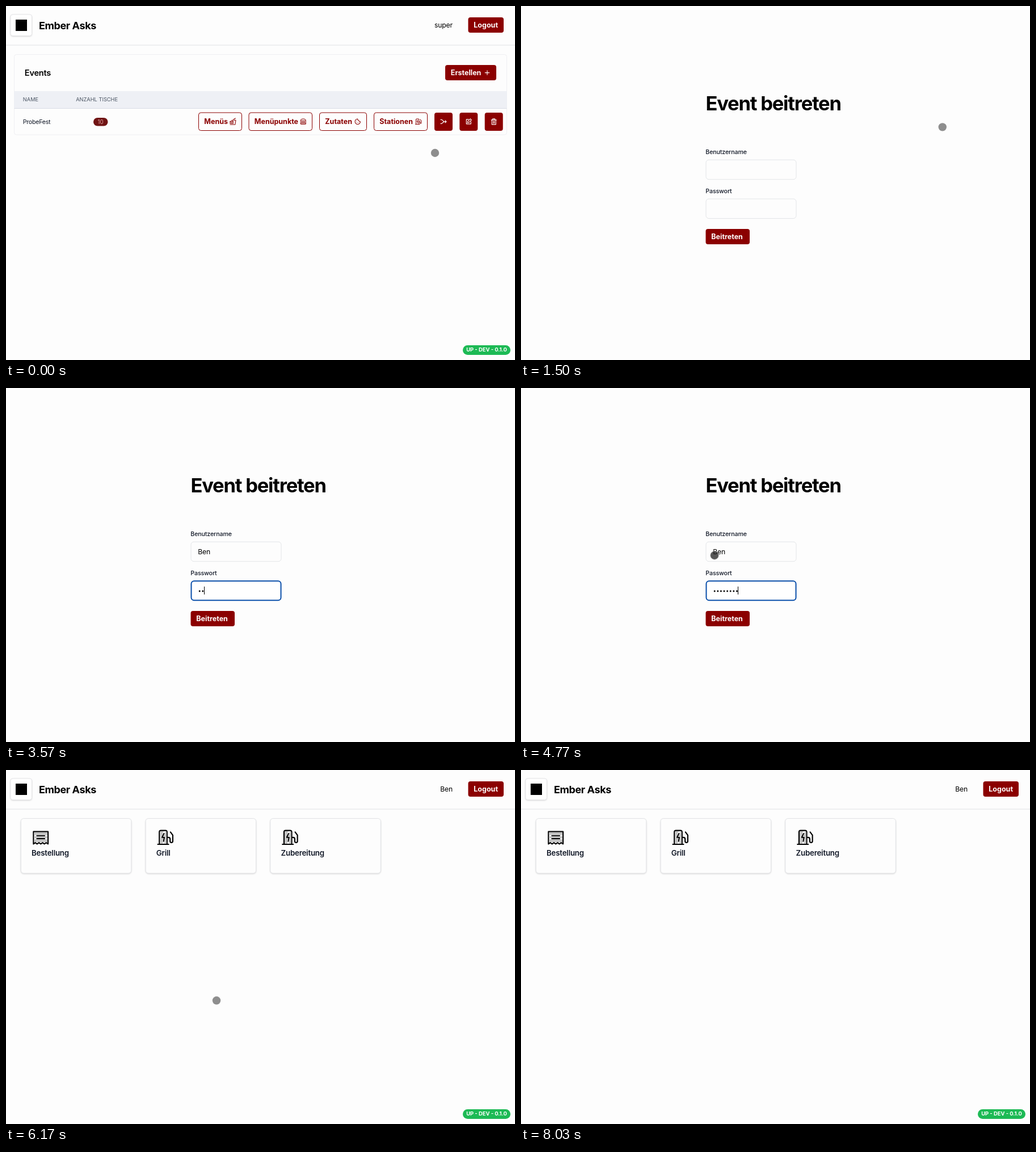
Recreate the animation shown at these times as an HTML page. Size 897x624 px, loop 8.11 s.

```html
<!DOCTYPE html>
<html lang="de">
<head>
<meta charset="utf-8">
<title>Event beitreten</title>
<style>
html, body { margin: 0; width: 100%; height: 100%; overflow: hidden; background: #fdfdfd; }
svg { display: block; width: 897px; height: 624px; }
text { font-family: Inter, "Open Sans", sans-serif; font-optical-sizing: none; white-space: pre; }
.shadow { filter: drop-shadow(0 1px 1px rgba(0, 0, 0, .14)); }
</style>
</head>
<body>
<svg id="stage" viewBox="0 0 897 624"></svg>
<script>
const LOOP = 8110, RED = '#8b0000', PAPER = '#fdfdfd';
const $ = id => document.getElementById(id);

const rect = (x, y, w, h, r, fill, more = '') =>
  `<rect x="${x}" y="${y}" width="${w}" height="${h}" rx="${r}" fill="${fill}" ${more}/>`;
const text = (x, y, str, size, weight = 400, fill = '#000', gap = 0, more = '') =>
  `<text x="${x}" y="${y}" font-size="${size}" font-weight="${weight}" fill="${fill}" letter-spacing="${gap}" ${more}>${str}</text>`;
const END = 'text-anchor="end"', MIDDLE = 'text-anchor="middle"';

// Icons live on a 24 unit grid
const shapes = {
  plus: 'M12 3v18M3 12h18',
  merge: 'M2 5h3c4 0 5 7 10 7h7M2 19h3c4 0 5-7 10-7M18 8l4 4-4 4',
  edit: 'M12 4H4v16h16v-8M8 16l1-5 9-9 4 4-9 9z',
  trash: 'M3 6h18M8 6V2h8v4M5 6v16h14V6M10 10v8M14 10v8',
  menu: 'M2 14a6 4 0 0 1 12 0zM2 18h12M3 22h17l2-15H9v3M15 7l1-4 5-2',
  burger: 'M3 9a9 6 0 0 1 18 0zM2 13h20M3 17h18v1a3 3 0 0 1-3 3H6a3 3 0 0 1-3-3z',
  cookie: 'M12 3a9 9 0 1 0 9 9a4 4 0 0 1-5-4a4 4 0 0 1-4-5zM8 10h.1M9 15h.1M14 15h.1',
  pump: 'M4 21V5a2 2 0 0 1 2-2h6a2 2 0 0 1 2 2v16zM2 21h14M14 12h2a2 2 0 0 1 2 2v3a1.7 1.7 0 0 0 3.5 0V9l-3-4M10 7l-2.5 5h3l-1 5',
  receipt: 'M2.5 4.5h19v16l-2.4-1.6-2.4 1.6-2.3-1.6-2.4 1.6-2.4-1.6-2.4 1.6-2.3-1.6-2.4 1.6zM7 9.7h10M7 13.7h10'
};
const icon = (name, x, y, size, color, width = 2, fill = 'none') =>
  `<path d="${shapes[name]}" transform="translate(${x} ${y}) scale(${size / 24})" fill="${fill}" stroke="${color}" stroke-width="${width}" stroke-linecap="round" stroke-linejoin="round"/>`;

const button = (x, y, w, h, label) =>
  rect(x, y, w, h, 4, RED) + text(x + 9.8, y + 18.3, label, 12.5, 700, '#fff');
const outlineButton = (x, w, label, name) =>
  rect(x, 188, w, 31.5, 4, PAPER, `stroke="${RED}"`) + text(x + 9.8, 208.3, label, 12.5, 700, RED) +
  icon(name, x + w - 22, 197.5, 12.5, RED);
const iconButton = (x, name) => rect(x, 188, 32, 32, 4, RED) + icon(name, x + 10, 197.8, 12, '#fff', 2.3);

const frame = user =>
  rect(8, 15, 37.5, 37.5, 4, '#fff', 'stroke="#e4e4e7" class="shadow"') + rect(17, 24, 20, 20, 0, '#000') +
  text(58, 40.5, 'Ember Asks', 18, 700, '#000', -.4) +
  text(787, 38.2, user, 12.2, 400, '#000', -.15, END) +
  button(814.5, 20, 62.5, 27, 'Logout') + rect(0, 68.5, 897, 1, 0, '#dfe1e5') +
  rect(805, 598, 84, 17, 8.5, '#1dba55') + text(847, 609.4, 'UP - DEV - 0.1.0', 9.4, 700, '#fff', 0, MIDDLE);

const eventsPage = frame('super') +
  rect(14.5, 85.5, 868, 141.5, 4, 'none', 'stroke="#efeff2"') +
  text(32.8, 123, 'Events', 14.6, 600, '#000', -.25) +
  button(774, 104, 90, 27, 'Erstellen') + icon('plus', 843, 112.6, 10, '#fff', 2.6) +
  rect(14.5, 150, 868, 30, 0, '#eef0f5') + rect(14.5, 180, 868, 1, 0, '#d9dde5') +
  text(29.8, 167.9, 'NAME', 9.25, 400, '#4b5563') + text(123.2, 167.9, 'ANZAHL TISCHE', 9.25, 400, '#4b5563') +
  text(29.8, 207.6, 'ProbeFest', 10.7, 400, '#111827', -.3) +
  rect(154, 197, 25.5, 14.5, 7.25, '#701414') + text(166.7, 207.7, '10', 9.8, 400, '#e0a3a3', 0, MIDDLE) +
  outlineButton(339.5, 76, 'Menüs', 'menu') + outlineButton(428, 111.5, 'Menüpunkte', 'burger') +
  outlineButton(552.5, 83, 'Zutaten', 'cookie') + outlineButton(648.5, 94, 'Stationen', 'pump') +
  iconButton(755, 'merge') + iconButton(799.3, 'edit') + iconButton(843.7, 'trash');

const field = (y, id) =>
  rect(326, y, 159, 34.5, 5, PAPER, 'stroke="#e3e5e8"') +
  rect(326.5, y + .3, 158, 34, 5, '#fff', `stroke="#0b50ab" stroke-width="2" id="${id}"`);
const dots = Array.from({ length: 8 }, (_, i) => `<circle class="dot" cx="${341.2 + 5.6 * i}" cy="358" r="1.5"/>`).join('');

const joinPage =
  text(325.5, 183.6, 'Event beitreten', 34.5, 700, '#000', -1.2) +
  text(325.3, 261, 'Benutzername', 10.7, 500, '#111827', -.15) + field(271.2, 'nameFocus') +
  text(338.3, 293, '', 12.2, 400, '#000', -.15, 'id="name"') +
  text(325.3, 329.7, 'Passwort', 10.7, 500, '#111827', -.15) + field(340, 'codeFocus') + dots +
  rect(0, 0, 1, 14, 0, '#000', 'id="caret"') + button(325.5, 393, 77.5, 27, 'Beitreten');

const card = (x, label, name) =>
  rect(x, 85.5, 194.5, 96.5, 5, PAPER, 'stroke="#e2e3e6" class="shadow"') +
  icon(name, x + 18.7, 102.6, 32.5, '#000', 1.6) +
  text(x + 18.7, 151, label, 13.3, 600, '#111827', -.2);
const tint = (x, d) => `<path d="${d}" transform="translate(${x} 102.6) scale(1.354)" fill="#c3c3c3"/>`;
const stationsPage = frame('Ben') +
  card(26.3, 'Bestellung', 'receipt') + card(246.1, 'Grill', 'pump') + card(465.8, 'Zubereitung', 'pump') +
  tint(45, 'M3.3 5.3h17.4v3.5H3.3zM3.3 10.6H20.7v2.2H3.3zM3.3 14.6h17.4v3.4H3.3z') +
  [264.8, 484.5].map(x => tint(x, 'M4.8 4h4.6l-2.9 8.6h2.7l-.8 7.5H4.8zM10.9 6l-1.8 5h2.6l-1.2 9h2.7V4z')).join('');

$('stage').innerHTML =
  [eventsPage, joinPage, stationsPage].map((page, i) => `<g id="page${i}">${page}</g>`).join('') +
  '<circle id="cursor" r="7.2"/>';

const pageStarts = [0, 1370, 5900];
const nameTimes = [2270, 2430, 2570];
const dotTimes = [3400, 3530, 3830, 4000, 4230, 4370, 4630, 4700];
const path = [ // time, x, y
  [0, 756, 259], [1070, 766, 215.5], [1230, 769, 208], [1400, 769, 208], [2070, 341, 295],
  [4770, 341, 295], [5270, 371, 406.3], [6970, 371, 406.3], [7230, 383, 510], [7430, 383, 510], [7630, 390, 634]
];
const hotAreas = [
  [[755, 188, 32, 32]],
  [[326, 271, 159, 35], [326, 340, 159, 35], [326, 393, 77, 27]],
  []
];

const clamp = v => v < 0 ? 0 : v > 1 ? 1 : v;
const ease = v => v * v * (3 - 2 * v);
const passed = (times, t) => times.filter(start => t >= start).length;

function cursorAt(t) {
  const next = path.findIndex(p => p[0] > t);
  if (next < 0) return path[path.length - 1].slice(1);
  const [t0, x0, y0] = path[next - 1], [t1, x1, y1] = path[next];
  const k = ease((t - t0) / (t1 - t0));
  return [x0 + (x1 - x0) * k, y0 + (y1 - y0) * k];
}

function draw(t) {
  const page = passed(pageStarts, t) - 1;
  pageStarts.forEach((_, i) => $('page' + i).style.display = i === page ? '' : 'none');

  if (page === 1) {
    const onCode = t >= 2900, typed = passed(dotTimes, t), swap = clamp((t - 2870) / 130);
    $('name').textContent = 'Ben'.slice(0, passed(nameTimes, t));
    $('nameFocus').style.opacity = t < 2070 ? 0 : 1 - swap;
    $('codeFocus').style.opacity = swap;
    document.querySelectorAll('.dot').forEach((dot, i) => dot.style.display = i < typed ? '' : 'none');
    const x = onCode ? 338 + 5.55 * typed : 338.3 + $('name').getComputedTextLength();
    $('caret').setAttribute('x', Math.round(x - .5));
    $('caret').setAttribute('y', onCode ? 350 : 281.5);
    $('caret').style.display = t < 2070 ? 'none' : '';
  }

  const [x, y] = cursorAt(t);
  const hot = hotAreas[page].some(([l, top, w, h]) => x > l && x < l + w && y > top && y < top + h);
  const cursor = $('cursor');
  cursor.setAttribute('cx', x);
  cursor.setAttribute('cy', y);
  cursor.setAttribute('fill', hot ? 'rgba(30,30,30,.75)' : 'rgba(0,0,0,.44)');
  cursor.setAttribute('stroke', hot ? 'rgba(150,150,150,.65)' : 'none');
  cursor.style.display = (t >= 2270 && t < 4730) || t >= 7630 ? 'none' : '';
}

const start = performance.now();
function tick() {
  draw((performance.now() - start) % LOOP);
  requestAnimationFrame(tick);
}
tick();
</script>
</body>
</html>
```
